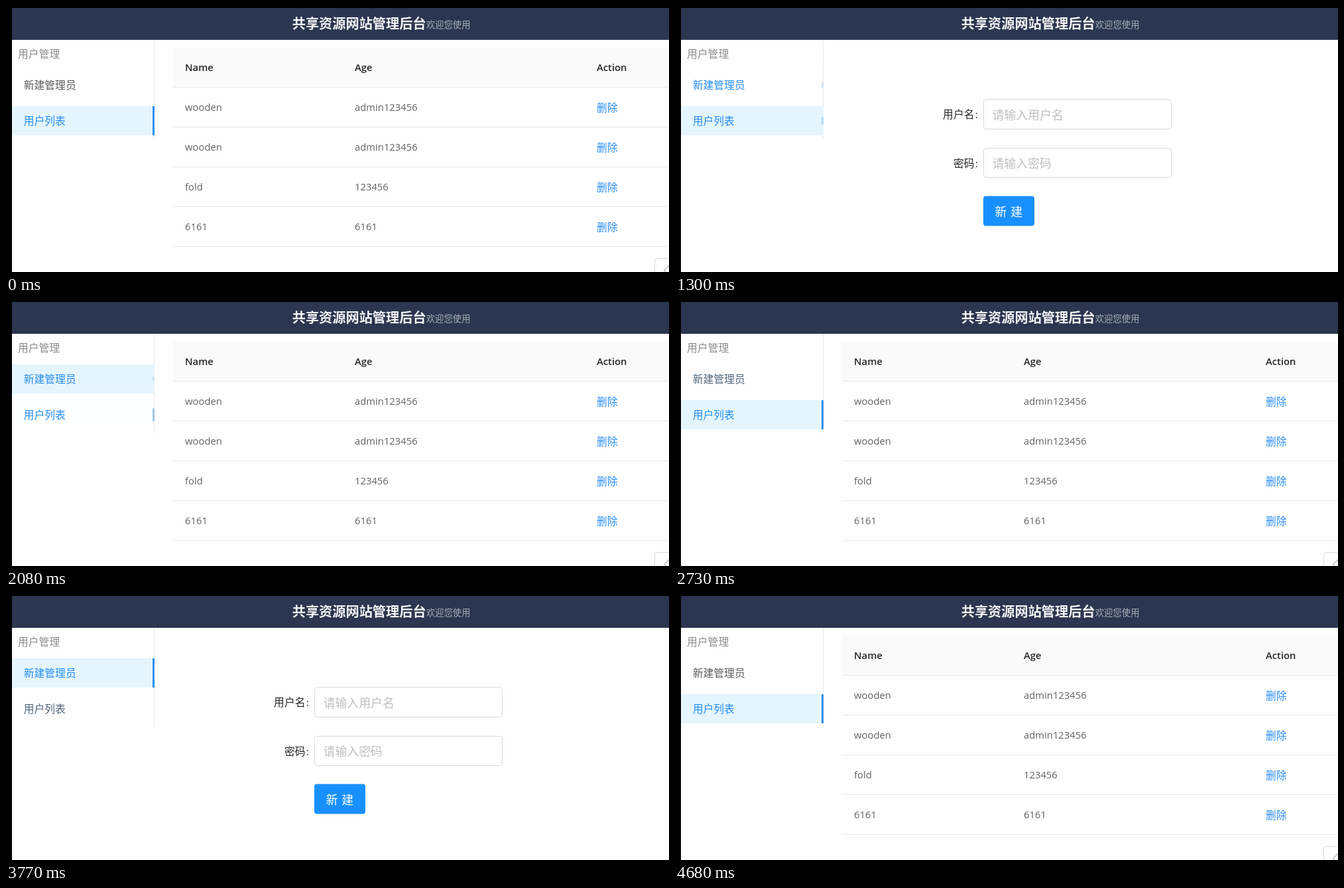
Write an HTML page that moves like this. It is 1000 by 401 pixels and loops after 5.59 s.

```html
<!DOCTYPE html>
<html lang="zh-CN">
<head>
<meta charset="utf-8">
<title>管理后台</title>
<style>
  html, body { margin: 0; width: 100%; height: 100%; overflow: hidden; background: #fefefe; }
  svg { display: block; width: 1000px; height: 401px; }
  text { font: 15.8px "Noto Sans CJK SC", "Noto Sans CJK", sans-serif; fill: #5c5c5c; white-space: pre; }
  .latin { font: 14.8px "Open Sans", sans-serif; fill: #626262; }
  .head { font-weight: 600; fill: #262626; }
  .title { font-size: 20.2px; font-weight: 700; fill: #f4f5f7; }
  .sub { font-size: 13.4px; fill: #abafba; }
  .group { fill: #8c8c8c; }
  .link { fill: #2b8ff5; }
  .label { fill: #262626; text-anchor: end; }
  .hint { font-size: 17.9px; fill: #bfbfbf; }
  .button { font-size: 17.9px; fill: #fff; }
  .box { fill: #fff; stroke: #d9d9d9; }
  .line { fill: #e9e9e9; }
</style>
</head>
<body>
<svg viewBox="0 0 1000 401">
  <rect width="1000" height="401" fill="#fefefe"/>

  <g id="list">
    <rect x="252" y="63" width="748" height="60" fill="#fafafa"/>
    <rect class="line" x="252" y="122" width="748" height="1"/>
    <text class="latin head" x="270" y="98.3">Name</text>
    <text class="latin head" x="526" y="98.3">Age</text>
    <text class="latin head" x="891" y="98.3">Action</text>
    <g id="rows"></g>
    <rect class="box" x="978.5" y="380.5" width="35" height="35" rx="4"/>
    <path d="M1000 391.5L992.5 398.5L1000 405.5" fill="none" stroke="#bdbdbd" stroke-width="1.3"/>
  </g>

  <g id="form">
    <text class="label" x="451.5" y="169.3">用户名</text>
    <text x="453" y="169" class="latin head" style="font-weight:400">:</text>
    <rect class="box" x="465.5" y="140.5" width="283" height="45" rx="4"/>
    <text class="hint" x="478.5" y="171">请输入用户名</text>
    <text class="label" x="451.5" y="242.8">密码</text>
    <text x="453" y="242.5" class="latin head" style="font-weight:400">:</text>
    <rect class="box" x="465.5" y="214.5" width="283" height="44" rx="4"/>
    <text class="hint" x="478.5" y="243.8">请输入密码</text>
    <rect x="465" y="286.5" width="77" height="45" rx="4" fill="#1890ff"/>
    <text class="button" x="482.5" y="317">新</text>
    <text class="button" x="506.3" y="317">建</text>
  </g>

  <rect class="line" x="223" y="51" width="1" height="149"/>
  <text class="group" x="18" y="78">用户管理</text>
  <g id="menu"></g>

  <rect x="9" y="3" width="991" height="48" fill="#2c3650"/>
  <text class="title" x="431.7" y="33.8">共享资源网站管理后台</text>
  <text class="sub" x="633.7" y="33.2">欢迎您使用</text>
  <path d="M0 0H1000V3H9V401H0Z" fill="#000"/>
</svg>
<script>
const LOOP = 5590, STEP = 130;
const $ = id => document.getElementById(id);

const users = [['wooden', 'admin123456'], ['wooden', 'admin123456'], ['fold', '123456'], ['6161', '6161']];
$('rows').innerHTML = users.map(([name, age], i) => {
  const y = 158.3 + 60 * i;
  return `<text class="latin" x="270" y="${y}">${name}</text>
    <text class="latin" x="526" y="${y}">${age}</text>
    <text class="link" x="891" y="${y + 0.7}">删除</text>
    <rect class="line" x="252" y="${182 + 60 * i}" width="748" height="1"/>`;
}).join('');

// Times at which the selection and the text highlight of each item flip.
const clicks = [1245, 2008, 2935, 4268];
const items = [
  { label: '新建管理员', y: 97, on: 0, tint: [668, 2008, 2618, 4268] },
  { label: '用户列表', y: 151, on: 1, tint: [1245, 1620, 2935, 3658] }
];
for (const item of items) {
  const g = document.createElementNS('http://www.w3.org/2000/svg', 'g');
  g.innerHTML = `<rect x="9" y="${item.y}" width="215" height="44" fill="#e4f5fe"/>
    <rect x="221" width="3" fill="#2f8fee"/>
    <text x="26.7" y="${item.y + 28}">${item.label}</text>`;
  $('menu').append(g);
  [item.back, item.bar, item.text] = g.children;
}

const inOut = p => p < 0.5 ? 4 * p ** 3 : 1 - 4 * (1 - p) ** 3;
const out = p => 1 - (1 - p) ** 3;

// Eased 0..1 level of a switch that starts at `on` and flips at the given times.
function level(t, flips, on, dur, fall = inOut) {
  const past = flips.filter(f => f <= t);
  if (!past.length) return on;
  const p = Math.min(1, (t - past[past.length - 1]) / dur);
  return (past.length + on) % 2 ? inOut(p) : 1 - fall(p);
}

const mix = (a, b, k) => `rgb(${a.map((v, i) => Math.round(v + (b[i] - v) * k))})`;

function draw(t) {
  const creating = clicks.filter(c => c <= t).length % 2;
  $('form').style.display = creating ? '' : 'none';
  $('list').style.display = creating ? 'none' : '';
  for (const { on, y, tint, back, bar, text } of items) {
    const size = level(t, clicks, on, 150, out);
    back.style.opacity = level(t, clicks, on, 300);
    bar.style.opacity = size;
    bar.setAttribute('y', y + 22 - 22 * size);
    bar.setAttribute('height', 44 * size);
    text.style.fill = mix([92, 92, 92], [36, 142, 245], level(t, tint, on, 300));
  }
}

const start = performance.now();
function tick() {
  const t = (performance.now() - start) % LOOP;
  draw(Math.floor(t / STEP) * STEP);
  requestAnimationFrame(tick);
}
tick();
</script>
</body>
</html>
```
